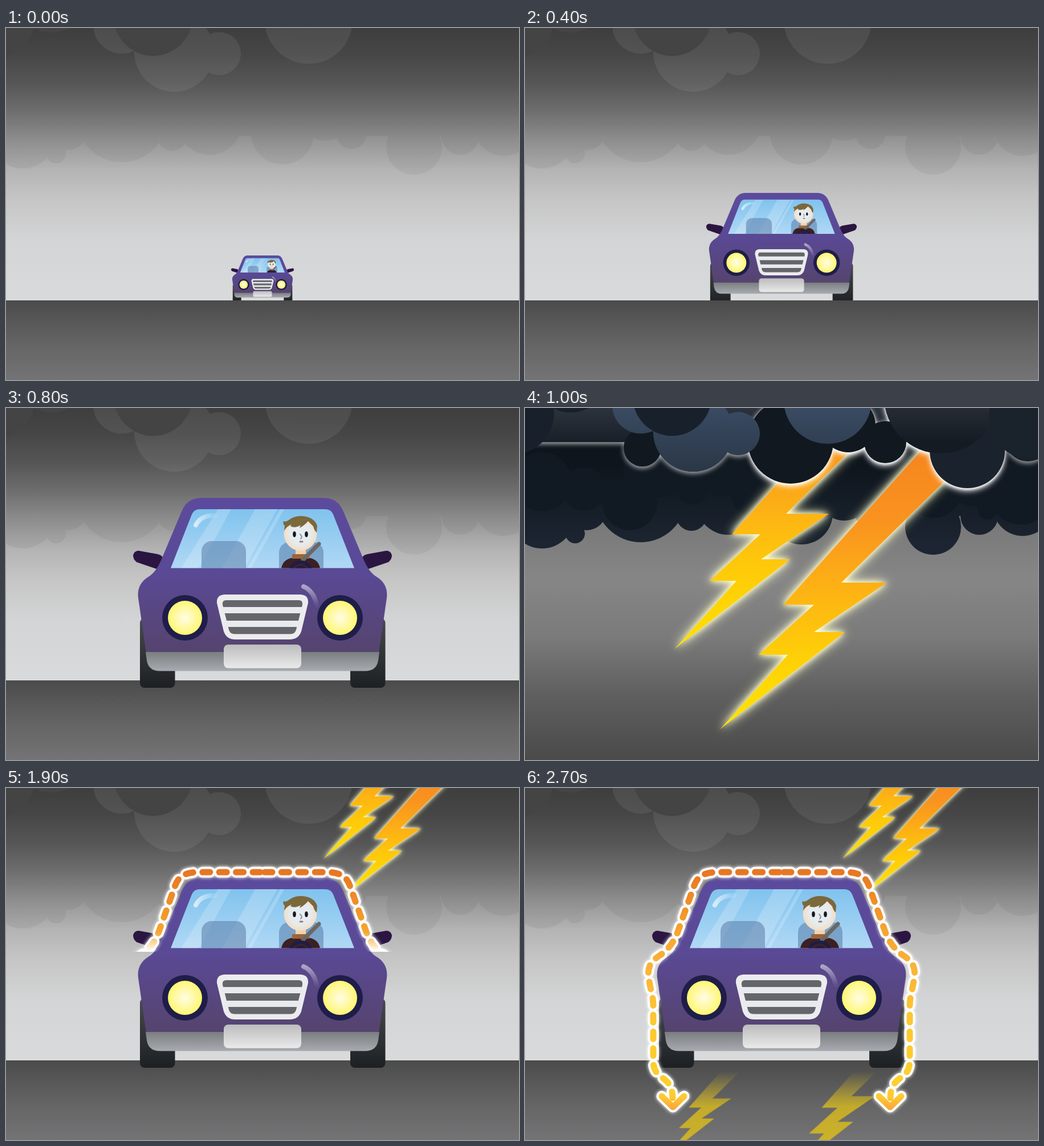
An HTML page for the animation above (3700 ms loop, 900 by 619 pixels).

```html
<!DOCTYPE html>
<html lang="en">
<head>
<meta charset="utf-8">
<title>Lightning and a car</title>
<style>
  html, body { margin: 0; width: 100%; height: 100%; overflow: hidden; background: #4a4a4a; }
  svg { display: block; width: 100vw; height: 100vh; }
  .bolt { filter: drop-shadow(0 0 5px #ffffd8) drop-shadow(0 0 9px #ffffc8); }
  .rim { filter: drop-shadow(0 2px 2px #fff) drop-shadow(0 3px 5px #fffd); }
  .softRim { filter: drop-shadow(0 3px 4px #fffa); }
  .halo { stroke: #fff; stroke-width: 19; filter: drop-shadow(0 0 3px #fff); }
  .current { stroke: url(#hot); stroke-width: 11; }
  .line { fill: none; stroke-linecap: round; stroke-linejoin: round; }
</style>
</head>
<body>
<svg viewBox="0 0 900 619" preserveAspectRatio="none">
  <defs id="defs">
    <radialGradient id="lamp"><stop stop-color="#fffce6"/><stop offset="1" stop-color="#fff772"/></radialGradient>
    <radialGradient id="skin"><stop stop-color="#e6eef3"/><stop offset=".65" stop-color="#e6ebed"/><stop offset="1" stop-color="#f5dcc2"/></radialGradient>
    <linearGradient id="gloss"><stop stop-color="#fff" stop-opacity=".65"/><stop offset="1" stop-color="#fff" stop-opacity=".1"/></linearGradient>
    <linearGradient id="shine" x2="0" y2="1"><stop stop-color="#fff" stop-opacity=".5"/><stop offset="1" stop-color="#fff" stop-opacity=".05"/></linearGradient>
    <linearGradient id="fade" gradientUnits="userSpaceOnUse" x2="0"><stop stop-color="#fff"/><stop offset="1" stop-color="#000"/></linearGradient>
    <mask id="reveal" maskUnits="userSpaceOnUse" x="0" y="0" width="900" height="619"><rect width="900" height="619" fill="url(#fade)"/></mask>
    <mask id="ground" maskUnits="userSpaceOnUse" x="0" y="0" width="900" height="619"><rect width="900" height="619" fill="url(#rise)"/></mask>
    <clipPath id="cut"><rect id="cutBox" width="900" height="0"/></clipPath>
    <clipPath id="horizon"><rect width="900" height="479"/></clipPath>
    <path id="glass" d="M340 178H560Q570 178 574 187L611 281.500H289L326 187Q330 178 340 178Z"/>
    <clipPath id="inside"><use href="#glass"/></clipPath>
    <path id="boltA" d="M262 424L371 304H324L413 222H363L534 30H617L458 186H533L414 266H465Z"/>
    <path id="boltB" d="M342 565L461 434H410L507 346H453L717 50H816L555 307H635L507 394H561Z"/>
    <path id="mirror" d="M233 251L266 257Q277 259 276 270L270 285L229 271Q223 266 223 259Q225 251 233 251Z"/>
    <g id="wheel"><rect x="235" y="370" width="61.500" height="122" rx="8"/></g>
    <g id="light"><circle cx="314" cy="369" r="40" fill="#1f1d49"/><circle cx="314" cy="369" r="30" fill="url(#lamp)"/></g>
    <path id="flow" stroke-dasharray="13 16.4" d="M454 148H560C588 148 597 156 603 171L632 253C639 272 650 285 663 294C683 307 686 318 682 340C679 358 675 366 675 384V480C675 498 666 505 657 511C646 519 641 530 641 545"/>
    <path id="arrow" d="M621 542L640.500 561L660 542"/>
  </defs>

  <g id="day">
    <rect width="900" height="619" fill="url(#sky)"/>
    <g id="haze"></g>
    <rect y="479" width="900" height="140" fill="url(#road)"/>
    <g id="carClip"><g id="car">
      <g fill="url(#tyre)"><use href="#wheel"/><use href="#wheel" x="369"/></g>
      <g fill="#2b1642"><use href="#mirror"/><use href="#mirror" transform="matrix(-1 0 0 1 900 0)"/></g>
      <path fill="url(#paint)" d="M342 158H558C575 158 586 167 592 182L628 268C636 285 642 292 652 298C664 306 670 318 668 334L654 431H246L232 334C230 318 236 306 248 298C258 292 264 285 272 268L308 182C314 167 325 158 342 158Z"/>
      <use href="#glass" fill="url(#pane)"/>
      <g clip-path="url(#inside)">
        <g fill="#fff" opacity=".2"><path d="M372 178H395L338 282H307Z"/><path d="M437 178H476L418 282H379Z"/><path d="M481 178H488L430 282H423Z"/></g>
        <g fill="#587ca8" opacity=".55"><rect x="343" y="234" width="78" height="70" rx="18"/><rect x="479" y="236" width="78" height="70" rx="18"/></g>
        <path fill="#3b2024" d="M483 282Q486 264 507 263H527Q548 264 551 282Z"/>
        <path fill="#f0d2b0" d="M508 246H526V259H508Z"/>
        <path fill="#9b653a" d="M502 257H532V265H502Z"/>
        <ellipse cx="516.500" cy="221" rx="29" ry="30" fill="url(#skin)"/>
        <path fill="#7b683b" d="M488 216L489 207Q485 204 487 199Q491 201 496 197Q507 189 520 190Q541 192 546 207L545 219Q541 216 539 208L530 199Q523 207 515 211L517 206Q508 212 499 208L501 205Q492 208 488 216Z"/>
        <g fill="#14161d"><ellipse cx="506" cy="222" rx="2.800" ry="5"/><ellipse cx="527" cy="222" rx="2.800" ry="5"/></g>
        <path class="line" stroke="#8d9097" stroke-width="2" d="M516 222Q521 227 517 230"/>
        <path class="line" stroke="#927d83" stroke-width="3" d="M516 235H520"/>
        <path class="line" stroke="#6d6763" stroke-width="7" d="M549 239L521 267"/>
        <circle cx="517" cy="290" r="19" fill="#432126" stroke="#1f1d45" stroke-width="6"/>
        <circle cx="517" cy="289" r="12" fill="#1f1d45"/>
      </g>
      <path class="line" stroke="url(#gloss)" stroke-width="8" d="M333 206Q342 188 367 189"/>
      <path class="line" stroke="url(#shine)" stroke-width="8" d="M522 314Q540 322 545 346"/>
      <use href="#light"/><use href="#light" x="272"/>
      <path fill="#ececef" d="M383 328H517Q531 329 530 343L518 393Q513 407 498 407H402Q387 407 382 393L370 343Q369 329 383 328Z"/>
      <path fill="#65666b" d="M386 338H514Q521 338 520 346L509 390Q507 397.500 499 397.500H401Q393 397.500 391 390L380 346Q379 338 386 338Z"/>
      <path fill="#e9eaee" d="M378 350H522V361H378ZM383 374H517V385H383Z"/>
      <path fill="url(#chrome)" d="M245 429H655L653 444Q650 462.500 630 462.500H270Q250 462.500 247 444Z"/>
      <rect x="382" y="416" width="136" height="41.500" rx="8" fill="url(#plate)"/>
    </g></g>
    <g id="strike">
      <g class="bolt" transform="translate(438 -71) scale(.455 .46)"><use href="#boltA" fill="url(#fireA)"/></g>
      <g class="bolt" transform="translate(442 -67) scale(.45)"><use href="#boltB" fill="url(#fireB)"/></g>
    </g>
    <g id="path" class="line">
      <g clip-path="url(#cut)"><g id="halo" class="halo"></g></g>
      <g mask="url(#reveal)"><g id="current" class="current"></g></g>
    </g>
    <g id="earth" mask="url(#ground)" fill="#dcbd1c">
      <use href="#boltA" transform="translate(127 464) scale(.441)"/>
      <use href="#boltB" transform="translate(287 384) scale(.515)"/>
    </g>
  </g>

  <g id="storm">
    <rect width="900" height="619" fill="url(#gloom)"/>
    <g id="back"></g>
    <use class="bolt" href="#boltA" fill="url(#fireA)"/>
    <use class="bolt" href="#boltB" fill="url(#fireB)"/>
    <g id="front"></g>
  </g>
</svg>
<script>
const $ = id => document.getElementById(id);

// Vertical gradient in stage coordinates: pairs of y and colour.
function shade(id, ...stops) {
  const top = stops[0], end = stops[stops.length - 2];
  let s = '';
  for (let i = 0; i < stops.length; i += 2)
    s += `<stop offset="${(stops[i] - top) / (end - top)}" stop-color="${stops[i + 1]}"/>`;
  return `<linearGradient id="${id}" gradientUnits="userSpaceOnUse" x1="0" x2="0" y1="${top}" y2="${end}">${s}</linearGradient>`;
}
const svgNS = markup => new DOMParser().parseFromString(
  `<svg xmlns="http://www.w3.org/2000/svg">${markup}</svg>`, 'image/svg+xml').documentElement.children;
const fillIn = (id, markup) => $(id).append(...svgNS(markup));

fillIn('defs',
  shade('sky', 0, '#424242', 50, '#4b4b4b', 100, '#5c5c5c', 150, '#767676', 200, '#979797', 250, '#b4b4b4', 300, '#c5c5c5', 370, '#d3d4d5', 479, '#d9dadb') +
  shade('road', 479, '#4b4b4b', 560, '#666', 619, '#747375') +
  shade('gloom', 200, '#787878', 300, '#868686', 400, '#7b7b7b', 500, '#606060', 619, '#4a4a4a') +
  shade('paint', 158, '#5c4b9d', 290, '#5a4995', 431, '#55446d') +
  shade('pane', 178, '#80c3ee', 281, '#b0d8f5') +
  shade('tyre', 370, '#474b4e', 492, '#1d2023') +
  shade('chrome', 429, '#7a7e80', 462, '#a7aab0') +
  shade('plate', 416, '#bcbcbe', 457, '#e9e9e9') +
  shade('fireA', 80, '#f8981d', 190, '#fdb414', 270, '#fec80a', 424, '#ffe100') +
  shade('fireB', 80, '#f6861f', 200, '#f9931f', 310, '#fdb015', 440, '#fed007', 565, '#ffe500') +
  shade('hot', 148, '#e87623', 190, '#ee8a27', 250, '#f6a42e', 330, '#fbb63b', 400, '#fdc634', 520, '#fdd02c', 542, '#fdcb30', 565, '#faa63c') +
  shade('rise', 498, '#000', 560, '#c8c8c8', 619, '#d8d8d8') +
  shade('low', 100, '#0e151d', 240, '#1c2531') +
  shade('top', 0, '#2d333c', 85, '#10171f') +
  shade('blue', -20, '#3c4e67', 112, '#2a3746') +
  shade('night', -10, '#2a2f35', 60, '#141b23'));

// Circles from flat x, y, radius triples.
function puffs(fill, ...n) {
  let s = '';
  for (let i = 0; i < n.length; i += 3) s += `<circle cx="${n[i]}" cy="${n[i + 1]}" r="${n[i + 2]}"/>`;
  return `<g fill="${fill}">${s}</g>`;
}
const lowRow = [30, 190, 57, 88, 221, 17, 108, 180, 35, 203, 156, 80, 292, 189, 27, 357, 166, 57, 485, 185, 55,
  560, 150, 48, 606, 187, 26, 716, 209, 49, 797, 190, 33, 873, 173, 52];
const innerRow = [30, 130, 52, 104, 143, 38, 184, 167, 48, 230, 100, 58, 294, 142, 28, 345, 110, 45, 400, 150, 40,
  717, 143, 50, 790, 120, 53, 870, 150, 55, 812, 178, 18];
const bank = (fill, h) => `<rect width="900" height="${h}" fill="${fill}"/>`;

fillIn('back', bank('url(#low)', 190) + puffs('url(#low)', ...lowRow) + puffs('#111922', ...innerRow));
fillIn('front',
  `<g class="softRim">${bank('url(#top)', 60)}${puffs('#111820', 206, 70, 33)}${puffs('#18202a', 882, 54, 40)}${puffs('url(#blue)', 295, 42, 70, 374, 45, 38)}</g>` +
  `<g class="rim">${puffs('#111820', 466, 58, 75, 567, 30, 48, 632, 60, 37)}${puffs('url(#night)', 730, -20, 100)}${puffs('#1a232d', 776, 75, 66)}</g>` +
  puffs('url(#night)', 730, -20, 100) + puffs('#1a222c', 890, 15, 76) +
  puffs('url(#blue)', 203, -5, 50, 295, 42, 70, 374, 45, 38, 531, -14, 77) +
  puffs('#18212b', 258, -20, 69, -20, 10, 71, 80, -60, 68));
fillIn('haze',
  `<g opacity=".045">${bank('#000', 190)}${puffs('#000', ...lowRow)}</g>` +
  `<g opacity=".07">${puffs('#fff', 203, -5, 50, 295, 42, 70, 374, 45, 38, 531, -14, 77)}</g>` +
  puffs('#444', 258, -20, 69, -20, -18, 71, 80, -60, 68));

const sides = id => `<use href="#${id}"/><use href="#${id}" transform="matrix(-1 0 0 1 900 0)"/>`;
for (const id of ['halo', 'current'])
  fillIn(id, sides('flow') + `<g class="head">${sides('arrow')}</g>`);

const approach = [[.243, 400], [.385, 355], [.582, 290], [.81, 211], [1, 158]]; // scale, roof height
const reach = [215, 288, 390, 495, 700];
const show = (el, on) => el.setAttribute('display', on ? 'inline' : 'none');

function draw(now) {
  const t = now % 3700;
  const step = Math.min(4, Math.floor(t / 200));
  const [scale, roof] = approach[step];
  const flash = t >= 1000 && t < 1500;
  show($('day'), !flash);
  show($('storm'), flash);
  $('car').setAttribute('transform', `translate(${450 - 450 * scale} ${roof - 158 * scale}) scale(${scale})`);
  $('carClip').setAttribute('clip-path', step < 4 ? 'url(#horizon)' : 'none');
  show($('strike'), t >= 1500);
  show($('path'), t >= 1700);
  const end = reach[Math.max(0, Math.min(4, Math.floor((t - 1700) / 200)))];
  $('cutBox').setAttribute('height', end);
  $('fade').setAttribute('y1', end - 35);
  $('fade').setAttribute('y2', end);
  document.querySelectorAll('.head').forEach(el => show(el, t >= 2500));
  show($('earth'), t >= 2700);
}
const start = performance.now();
function tick() {
  draw(performance.now() - start);
  requestAnimationFrame(tick);
}
tick();
</script>
</body>
</html>
```
